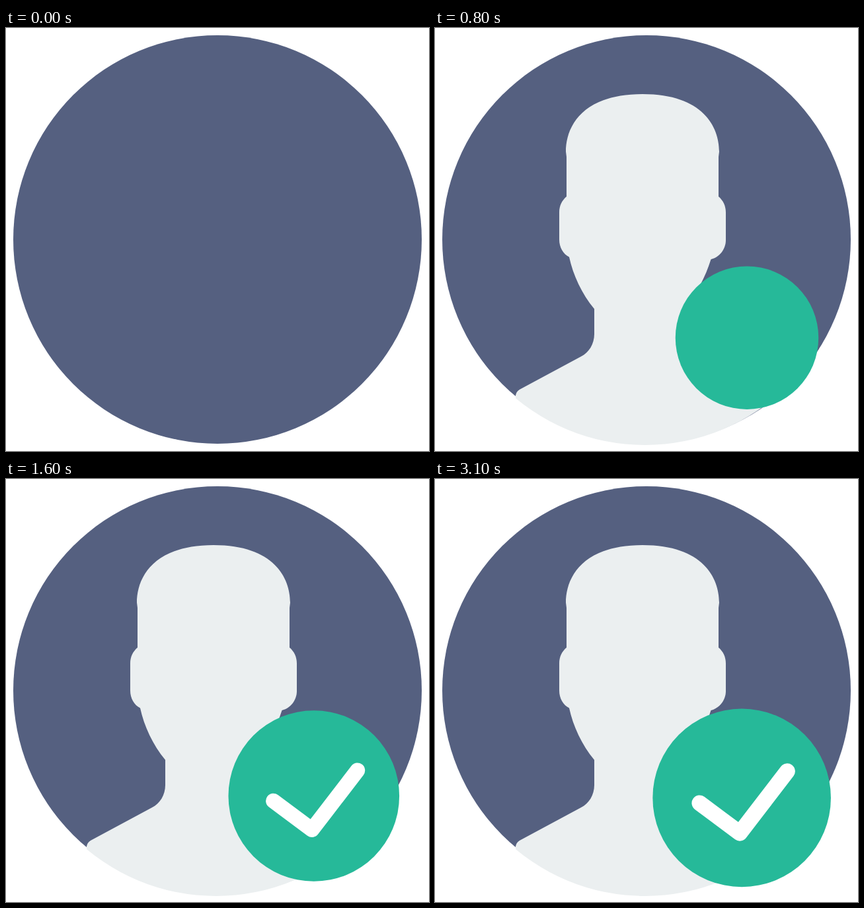
Animation, 640 px wide and 640 px high, one loop 3.2 s. Source, as an HTML page:

```html
<!DOCTYPE html>
<html lang="en">
<head>
<meta charset="utf-8">
<title>Verified profile</title>
<style>
  html, body { margin: 0; width: 100%; height: 100%; overflow: hidden; background: #fff; }
  svg { display: block; width: 100%; height: 100%; }
</style>
</head>
<body>
<svg viewBox="0 0 640 640">
  <defs>
    <clipPath id="disc"><ellipse cx="317.5" cy="321" rx="307" ry="310"/></clipPath>
  </defs>
  <circle cx="320" cy="320" r="309" fill="#556080"/>
  <g clip-path="url(#disc)">
    <path id="person" fill="#ebeff0" d="M198 187C198 150 222 100 314 100S430 150 430 187L429 195V255
      C436 261 440 269 440 279V321C440 335 430 347 417.500 350C409 377 396 402 377 425V463
      C377 478 384 490 397 497L490 547Q496 551 496 556V660H122V556Q123 550 128 547L221 497
      C233 491 241 478 241 463V425C222 402 209 374 203 346.500C194 342 188 332 188 320V279
      C188 269 192 261 199 255V195Z"/>
  </g>
  <g id="badge">
    <circle r="135.300" fill="#26b999"/>
    <path id="tick" d="M-64 8L-3 53.500L69 -40.300" pathLength="1" fill="none" stroke="#fff"
      stroke-width="24" stroke-linecap="round" stroke-linejoin="round"/>
  </g>
</svg>
<script>
  const LOOP = 3200, STEP = 100;
  const [person, badge, tick] = ['person', 'badge', 'tick'].map(id => document.getElementById(id));
  const clamp = v => Math.min(1, Math.max(0, v));

  // Linear travel from -range to 0, then a damped swing that keeps the arrival speed.
  function spring(t, start, end, range) {
    const speed = range / (end - start);
    if (t < end) return Math.max(-range, speed * (t - end));
    const w = 2 * Math.PI / 800, dt = t - end;
    return speed / w * Math.sin(w * dt) * Math.exp(-dt / 500);
  }

  function draw(t) {
    const away = 415 * (1 - Math.pow(clamp(t / 620), 1.65));
    person.setAttribute('transform', `translate(${-away} ${away * 0.486})`);

    const grow = spring(t, 480, 880, 1);
    const rise = spring(t, 480, 760, 104);
    badge.setAttribute('visibility', t > 480 ? 'visible' : 'hidden');
    badge.setAttribute('transform',
      `translate(${464 - 40 * grow} ${482.2 - rise}) scale(${1 + grow})`);

    const drawn = clamp((t - 880) / 390);
    tick.style.display = drawn > 0 ? '' : 'none';
    tick.setAttribute('stroke-dasharray', drawn < 1 ? `${drawn} 2` : 'none');
  }

  const began = performance.now();
  function tickFrame() {
    const t = (performance.now() - began) % LOOP;
    draw(Math.floor(t / STEP) * STEP);
    requestAnimationFrame(tickFrame);
  }
  tickFrame();
</script>
</body>
</html>
```
